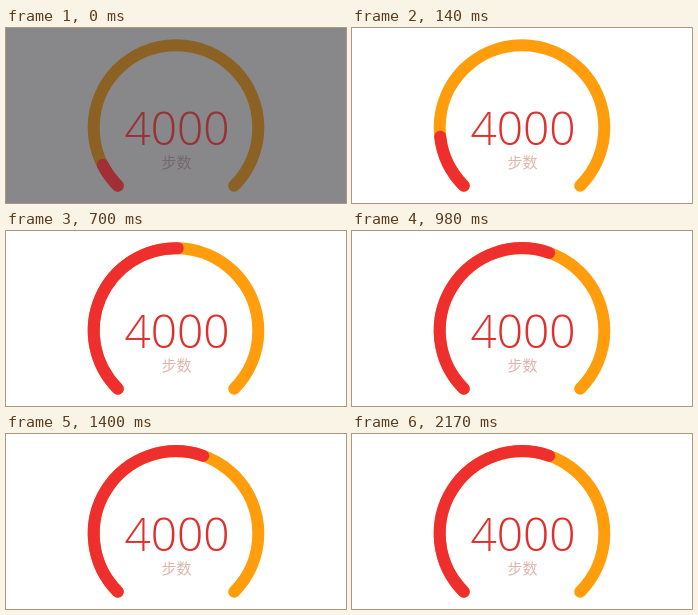
An HTML page that plays this animation: 340 by 175 pixels, repeating every 2240 ms.

```html
<!DOCTYPE html>
<html lang="zh-CN">
<head>
<meta charset="utf-8">
<title>步数</title>
<style>
  html, body { margin: 0; width: 100%; height: 100%; overflow: hidden; }
  svg { display: block; width: 340px; height: 175px; }
  path { fill: none; stroke-width: 12; stroke-linecap: round; }
  text { text-anchor: middle; }
  #count { font: 300 46px "Open Sans", "Noto Sans", sans-serif; }
  #label { font: 300 15px "Noto Sans CJK SC", "Noto Sans CJK", sans-serif; }
</style>
</head>
<body>
<svg viewBox="0 0 340 175">
  <rect id="back" width="340" height="175"/>
  <path id="track"/>
  <path id="progress"/>
  <text id="count" x="171" y="116.5">4000</text>
  <text id="label" x="170.5" y="140.2">步数</text>
</svg>
<script>
const LOOP = 2240, STEP = 70;
const CENTER = { x: 170, y: 99.5 }, RADIUS = 82.3;
const START = 135, SWEEP = 270, GOAL = 7000, COUNT = 4000;

// The screen brightens in two hard steps before it is fully lit.
const THEMES = [
  { back: '#888789', track: '#8b6124', progress: '#a03035', count: '#983034', label: '#75696b' },
  { back: '#c8c8c8', track: '#c97f14', progress: '#c12c2e', count: '#c02d2e', label: '#b89594' },
  { back: '#ffffff', track: '#ff9d0d', progress: '#ef2e2e', count: '#df302d', label: '#dfb5ab' }
];

const $ = id => document.getElementById(id);

function point(degrees) {
  const a = degrees * Math.PI / 180;
  return `${(CENTER.x + RADIUS * Math.cos(a)).toFixed(2)} ${(CENTER.y + RADIUS * Math.sin(a)).toFixed(2)}`;
}

function arc(sweep) {
  return `M${point(START)}A${RADIUS} ${RADIUS} 0 ${sweep > 180 ? 1 : 0} 1 ${point(START + sweep)}`;
}

const easeInOut = u => (1 - Math.cos(Math.PI * u)) / 2;

function render(time) {
  const step = Math.floor((time % LOOP) / STEP);
  const theme = THEMES[Math.min(step, 2)];
  // The sweep is already under way at the start and pauses for one step.
  const u = Math.min(((step === 1 ? 0 : step) + 4) / 18, 1);

  $('progress').setAttribute('d', arc(SWEEP * COUNT / GOAL * easeInOut(u)));
  for (const id of ['back', 'count', 'label']) $(id).setAttribute('fill', theme[id]);
  for (const id of ['track', 'progress']) $(id).setAttribute('stroke', theme[id]);
}

$('track').setAttribute('d', arc(SWEEP));
const begin = performance.now();
function tick() {
  render(performance.now() - begin);
  requestAnimationFrame(tick);
}
tick();
</script>
</body>
</html>
```
